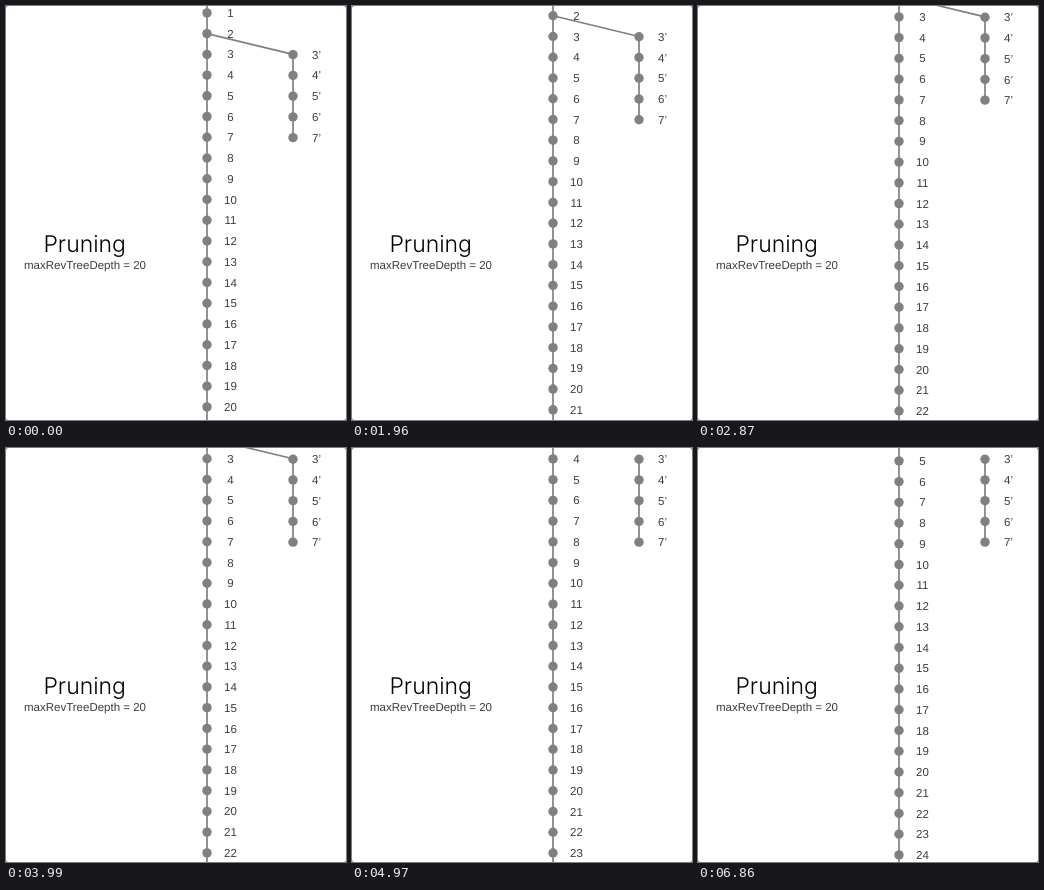
Animation of 340x414 px, one loop 6.93 s. Source, as an HTML page:

```html
<!DOCTYPE html>
<html lang="en">
<head>
<meta charset="utf-8">
<title>Pruning</title>
<style>
  html, body { margin: 0; width: 100%; height: 100%; overflow: hidden; background: #777; }
  svg { display: block; }
  text {
    font: 11.5px "Liberation Sans", Arial, sans-serif;
    text-anchor: middle;
    text-rendering: geometricPrecision;
    fill: #3c3c3c;
  }
  .title { font: 300 23px Inter, sans-serif; fill: #000; }
  circle { fill: #808080; }
  line { stroke: #808080; stroke-width: 1.7; }
</style>
</head>
<body>
<svg width="340" height="414" viewBox="0 0 340 414">
  <rect width="340" height="414" rx="2.5" fill="#fff"/>
  <text class="title" x="78.7" y="246">Pruning</text>
  <text x="79" y="263">maxRevTreeDepth = 20</text>
  <line x1="201" y1="0" x2="201" y2="414"/>
  <g id="trunk"></g>
  <g id="branch"></g>
</svg>
<script>
const LOOP = 6930, STEP = 1000, GAP = 20.74, TOP = 10.9;
const TRUNK_X = 201, BRANCH_X = 287;
const stepStarts = [-290, 1810, 3945, 6060];
const trunk = document.getElementById('trunk');
const branch = document.getElementById('branch');

const rowY = n => TOP + GAP * (n - 1);
const line = (x1, y1, x2, y2) => `<line x1="${x1}" y1="${y1}" x2="${x2}" y2="${y2}"/>`;
const node = (x, n, mark = '') =>
  `<circle cx="${x}" cy="${rowY(n)}" r="4.7"/>` +
  `<text x="${x + 23.5}" y="${rowY(n) + 4.1}">${n}${mark}</text>`;

let trunkParts = line(TRUNK_X, rowY(2), BRANCH_X, rowY(3));
for (let n = 1; n <= 25; n++) trunkParts += node(TRUNK_X, n);
trunk.innerHTML = trunkParts;

let branchParts = line(BRANCH_X, rowY(3), BRANCH_X, rowY(7));
for (let n = 3; n <= 7; n++) branchParts += node(BRANCH_X, n, '’');
branch.innerHTML = branchParts;

const ease = t => (1 - Math.cos(Math.PI * Math.min(1, Math.max(0, t)))) / 2;

function draw() {
  const time = performance.now() % LOOP;
  const rows = stepStarts.reduce((sum, start) => sum + ease((time - start) / STEP), 0);
  trunk.setAttribute('transform', `translate(0 ${-GAP * rows})`);
  // The branch stays behind once its parent has been pruned.
  branch.setAttribute('transform', `translate(0 ${0.3 - GAP * Math.min(rows, 2)})`);
  requestAnimationFrame(draw);
}
draw();
</script>
</body>
</html>
```
